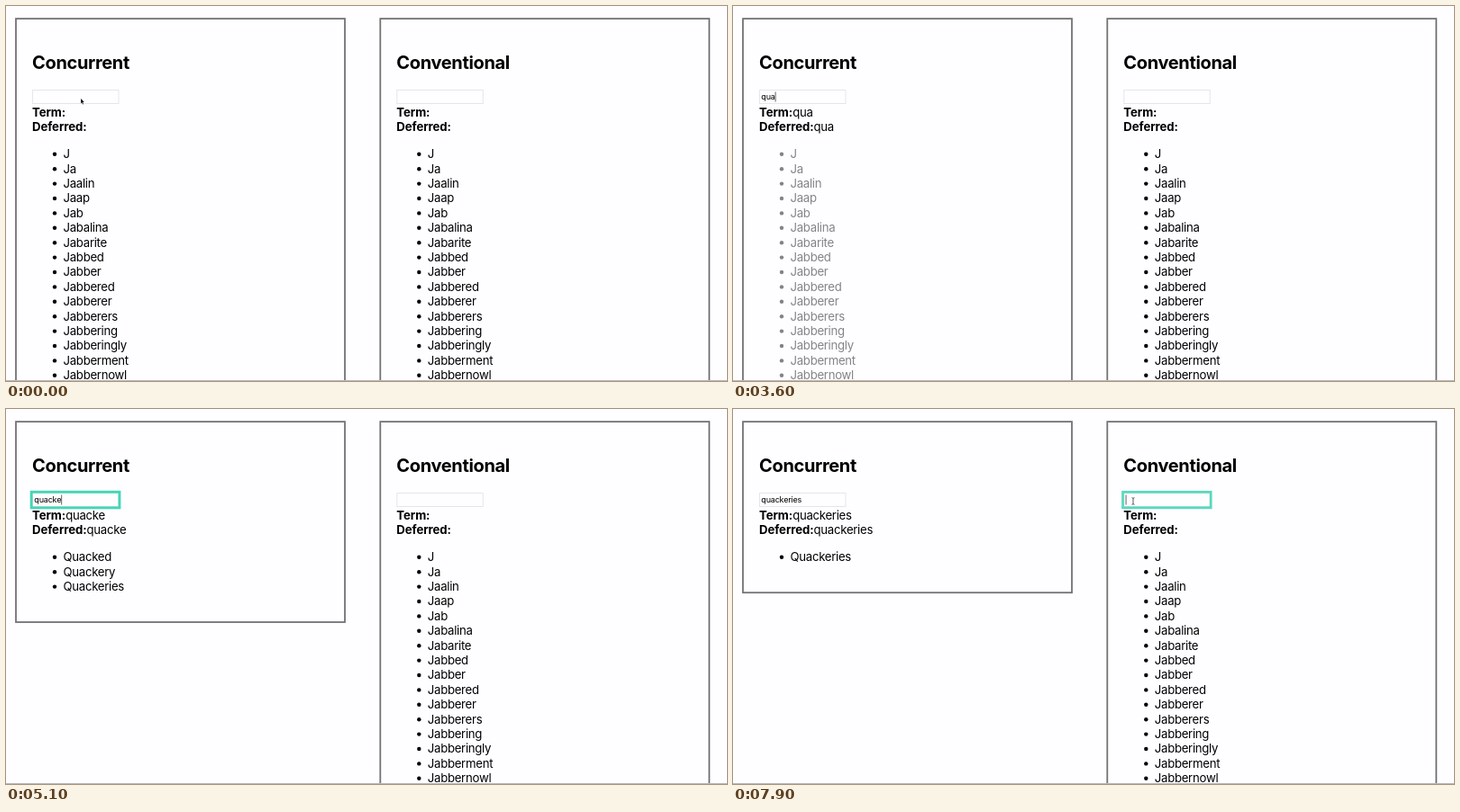
An HTML page for the animation above (8000 ms loop, 800x417 px).

```html
<!DOCTYPE html>
<html lang="en">
<head>
<meta charset="utf-8">
<title>Concurrent and conventional filtering</title>
<style>
  html, body { margin: 0; width: 100%; height: 100%; overflow: hidden; background: #fefdff; }
  svg { display: block; width: 800px; height: 417px; }
  text { font: 13.2px Inter, "Open Sans", sans-serif; letter-spacing: -.022em; fill: #000; }
  .title { font-size: 20px; font-weight: 700; letter-spacing: -.017em; }
  .label { font-weight: 700; letter-spacing: -.006em; }
  .typed { font-size: 9px; letter-spacing: -.02em; }
  .frame { fill: none; stroke: #737373; stroke-width: 1.8; }
  .field { fill: none; stroke: #e6e5ea; }
  .ring { fill: none; stroke: #45d6b7; }
</style>
</head>
<body>
<svg id="stage" viewBox="0 0 800 417"></svg>
<script>
const LOOP = 8000, TICK = 100, ROWS = 16, PITCH = 16.4;

const words = `J Ja Jaalin Jaap Jab Jabalina Jabarite Jabbed Jabber Jabbered Jabberer
  Jabberers Jabbering Jabberingly Jabberment Jabbernowl Jacquard Jacquards
  Jusquaboutisme Jusquaboutist Qua Quaaroot Quaaroots Quab Quabird Quachil Quack
  Quacked Quackery Quackeries Quackhood Quacky Quackier Quackiest Quacking Quackish
  Quackishly Quackishness Quackism Quackisms Quackle Quackled`.split(/\s+/);

const query = 'quackeries';
const keyTimes = [2000, 2500, 3200, 3800, 4700, 5000, 5500, 5800, 5900, 6100];

// The shorter the query, the longer its list takes to render.
const lag = i => Math.max(50, 800 - 200 * i);
const lettersAt = (t, lags) => keyTimes.filter((key, i) => key + lags * lag(i) <= t).length;
const fade = (t, from, length) => Math.min(1, Math.max(0, (t - from) / length));

const stage = document.getElementById('stage');

function set(node, attrs) {
  for (const key in attrs) node.setAttribute(key, attrs[key]);
}

function add(parent, tag, attrs = {}, content = '') {
  const node = document.createElementNS('http://www.w3.org/2000/svg', tag);
  set(node, attrs);
  node.textContent = content;
  return parent.appendChild(node);
}

function show(node, on) {
  node.style.display = on ? '' : 'none';
}

function labelled(parent, y, name) {
  const line = add(parent, 'text', { x: 29, y });
  add(line, 'tspan', { class: 'label' }, name);
  return add(line, 'tspan');
}

function panel(x, name) {
  const g = add(stage, 'g', { transform: `translate(${x})` });
  const p = { frame: add(g, 'rect', { class: 'frame', x: 11, y: 14.1, width: 365 }) };
  add(g, 'text', { class: 'title', x: 29, y: 69.7 }, name);
  add(g, 'rect', { class: 'field', x: 29.5, y: 93.5, width: 95.5, height: 15 });
  p.ring = add(g, 'rect', { class: 'ring' });
  p.typed = add(g, 'text', { class: 'typed', x: 31.3, y: 104.2 });
  p.caret = add(g, 'rect', { y: 95.5, width: .9, height: 11, fill: '#555' });
  p.term = labelled(g, 122.7, 'Term:');
  p.deferred = labelled(g, 139.1, 'Deferred:');
  p.list = add(g, 'g');
  p.rows = Array.from({ length: ROWS }, (_, i) => {
    const row = add(p.list, 'g', { transform: `translate(0 ${i * PITCH})` });
    add(row, 'circle', { cx: 54, cy: 164.8, r: 2.2 });
    return { row, text: add(row, 'text', { x: 63.5, y: 169.3 }) };
  });
  return p;
}

function fill(p, typed, deferred, listed) {
  const filter = query.slice(0, listed);
  const hits = words.filter(w => w.toLowerCase().includes(filter)).slice(0, ROWS);
  p.typed.textContent = p.term.textContent = query.slice(0, typed);
  p.deferred.textContent = query.slice(0, deferred);
  p.rows.forEach(({ row, text }, i) => {
    show(row, i < hits.length);
    text.textContent = hits[i] || '';
  });
  set(p.list, { opacity: listed < typed ? .48 : 1 });
  set(p.frame, { height: 173.7 + PITCH * hits.length });
}

// The ring grows outwards from the edge of the field.
function focus(p, strength, caretOn) {
  const w = 1.7 + 1.2 * strength;
  set(p.ring, {
    opacity: strength, 'stroke-width': w,
    x: 29.6 - w / 2, y: 93.7 - w / 2, width: 94.9 + w, height: 14.7 + w
  });
  show(p.caret, caretOn);
  const width = p.typed.textContent ? p.typed.getComputedTextLength() : 0;
  set(p.caret, { x: 31.3 + width });
}

const left = panel(0, 'Concurrent');
const right = panel(404.3, 'Conventional');
fill(right, 0, 0, 0);
add(stage, 'rect', { y: 416, width: 800, height: 1, fill: '#b9b8ba' });
const arrow = add(stage, 'path', {
  d: 'M0 0V5.8L1.3 4.6L2.2 6.6L3.2 6.2L2.3 4.2H4Z', stroke: '#fff', 'stroke-width': .3
});
const beam = add(stage, 'path', {
  d: 'M-1.5 -3.8Q0 -3.8 0 -2.8Q0 -3.8 1.5 -3.8M0 -2.8V2.8M-1.5 3.8Q0 3.8 0 2.8Q0 3.8 1.5 3.8',
  fill: 'none', stroke: '#333', 'stroke-width': .8
});

// The pointer hides while typing, then crosses over to the other field.
function point(t) {
  const cross = fade(t, 7000, 600);
  const ease = cross * cross * (3 - 2 * cross);
  const x = 83 - 8 * fade(t, 0, 1100) + 369 * ease;
  const y = 101 + 1.8 * (1 - fade(t, 0, 300)) + 12 * Math.sin(Math.PI * cross) + 1.5 * cross;
  const shown = t < keyTimes[0] || t >= 7100;
  const inField = t >= 300 && (x < 125 || x > 434);
  show(arrow, shown && !inField);
  show(beam, shown && inField);
  set(inField ? beam : arrow, { transform: `translate(${x} ${y})` });
}

function draw(t) {
  const typed = lettersAt(t, 0), done = lettersAt(t, 2);
  // Lists for one or two letters are interrupted before they appear.
  fill(left, typed, lettersAt(t, 1), done < 3 ? 0 : done);
  const glow = typed ? fade(t, 3600, 600) - fade(t, 7400, 300) : fade(t, 300, 1800);
  focus(left, glow, t >= 300 && t < 6600);
  focus(right, fade(t, 7500, 450), t >= 7600);
  point(t);
}

const start = performance.now();
let last;
function loop() {
  const t = Math.floor((performance.now() - start) % LOOP / TICK) * TICK;
  if (t !== last) draw(last = t);
  requestAnimationFrame(loop);
}
loop();
</script>
</body>
</html>
```
